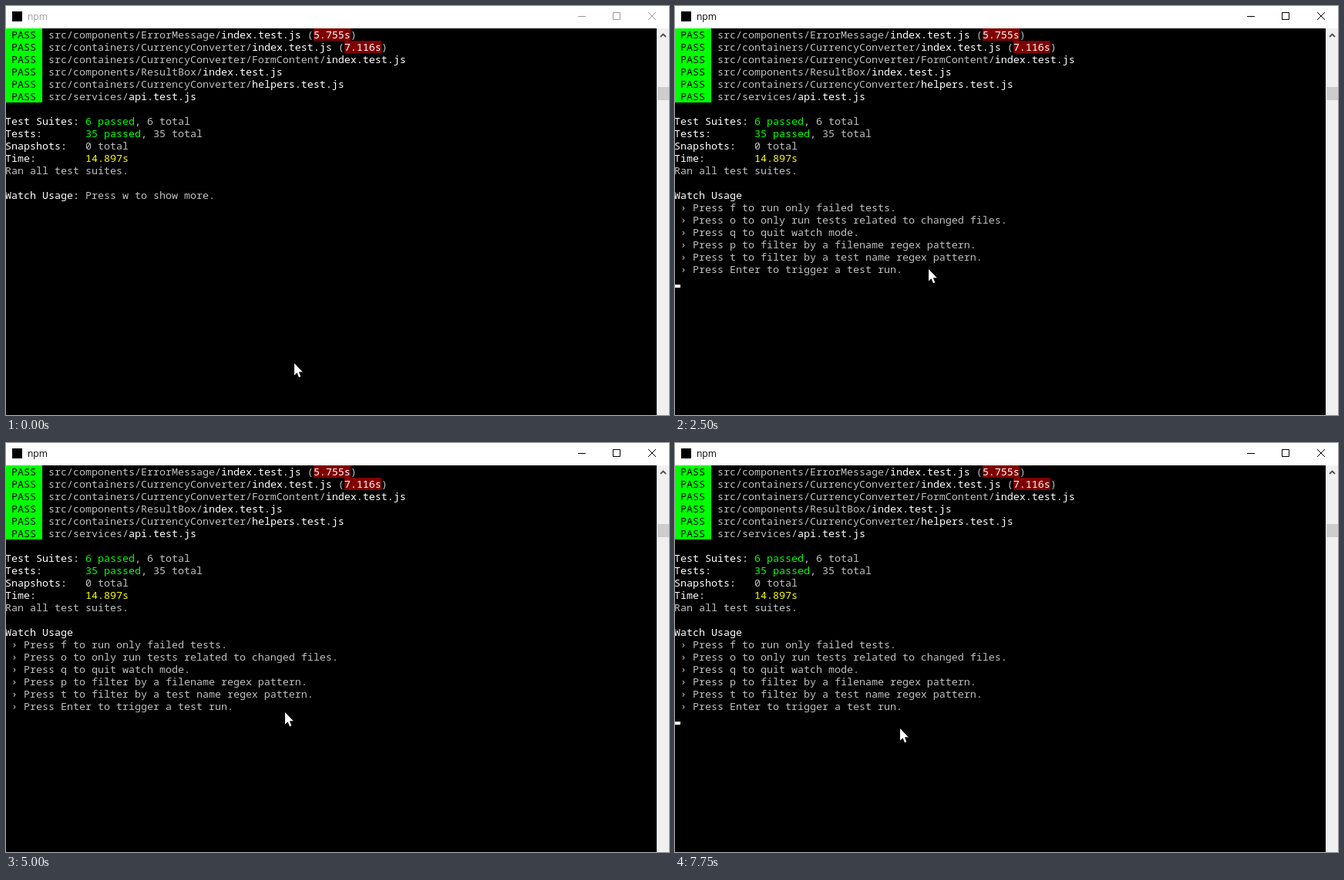
An HTML page that plays this animation: 860x530 px, repeating every 8000 ms.

```html
<!DOCTYPE html>
<html lang="en">
<head>
<meta charset="utf-8">
<title>npm</title>
<style>
  html, body { margin: 0; width: 100%; height: 100%; overflow: hidden; background: #000; }
  #stage { position: relative; width: 860px; height: 530px; overflow: hidden; background: #000; }
  pre {
    position: absolute; left: -1px; top: 29px; margin: 0;
    font: 13.3333px/16px "Noto Sans Mono", monospace; color: #c0c0c0;
  }
  pre span { display: inline-block; height: 16px; }
  .w, .g, .y { font-weight: 500; }
  .w { color: #fff; }
  .g { color: #0f0; }
  .y { color: #ff0; }
  .pass { color: #000; background: #0f0; }
  .slow { color: #fff; background: #800000; }
  svg { position: absolute; left: 0; top: 0; }
</style>
</head>
<body>
<div id="stage">
  <pre id="screen"></pre>
  <svg width="860" height="530">
    <rect width="860" height="29" fill="#fff"/>
    <rect x="8" y="7" width="13" height="13"/>
    <g id="titleBar">
      <text x="28" y="18" font-size="12" font-family="Open Sans, sans-serif">npm</text>
      <path d="M742 13.5h10M787.5 8.5h9v9h-9zM833 8l10 10M843 8l-10 10" fill="none" stroke="currentColor"/>
    </g>
    <rect x="844" y="29" width="16" height="501" fill="#f0f0f0"/>
    <rect x="845" y="105" width="15" height="17" fill="#cdcdcd"/>
    <path d="M849 40l3.5-3.5 3.5 3.5" fill="none" stroke="#505050" stroke-width="1.8"/>
    <rect id="caret" width="8" height="4" fill="#fff"/>
    <path id="mouse" d="M0 0V15.6L3.5 12.3 6 18.3 8.3 17.3 5.9 11.3H10.8Z" fill="#fff"/>
  </svg>
</div>
<script>
const LOOP = 8000, STEP = 250;
const FOCUS = 1250, CARET_SHOWN = 1750, MENU = 2500;
const BLINK_START = 2755, BLINK = 530;
const $ = id => document.getElementById(id);
const span = (cls, text) => `<span class="${cls}">${text}</span>`;

const suite = (folder, file, time) =>
  span('pass', ' PASS ') + ` src/${folder}/` + span('w', file + '.test.js') +
  (time ? ` (${span('slow', time)})` : '');
const stat = (label, color, value, rest = '') =>
  span('w', label.padEnd(13)) + span(color, value) + rest;

const report = [
  suite('components/ErrorMessage', 'index', '5.755s'),
  suite('containers/CurrencyConverter', 'index', '7.116s'),
  suite('containers/CurrencyConverter/FormContent', 'index'),
  suite('components/ResultBox', 'index'),
  suite('containers/CurrencyConverter', 'helpers'),
  suite('services', 'api'),
  '',
  stat('Test Suites:', 'g', '6 passed', ', 6 total'),
  stat('Tests:', 'g', '35 passed', ', 35 total'),
  stat('Snapshots:', '', '0 total'),
  stat('Time:', 'y', '14.897s'),
  'Ran all test suites.',
  ''
];
const hint = [span('w', 'Watch Usage:') + ' Press w to show more.'];
const menu = [
  span('w', 'Watch Usage'),
  ...[
    'f to run only failed tests.',
    'o to only run tests related to changed files.',
    'q to quit watch mode.',
    'p to filter by a filename regex pattern.',
    't to filter by a test name regex pattern.',
    'Enter to trigger a test run.'
  ].map(text => ' › Press ' + text)
];

// The pointer rests between straight strokes.
const home = { x: 374, y: 463 };
const strokes = [
  { from: 0, to: 250, x: 343, y: 413 },
  { from: 250, to: 1000, x: 329, y: 341 },
  { from: 2500, to: 2750, x: 329, y: 356 },
  { from: 3000, to: 3500, x: 330, y: 335 },
  { from: 3750, to: 4000, x: 341, y: 345 },
  { from: 4250, to: 5000, x: 362, y: 349 },
  { from: 5000, to: 5250, x: 351, y: 358 },
  { from: 5500, to: 5750, x: 291, y: 361 },
  { from: 6750, to: 7000, x: 292, y: 370 }
];
const pointerAt = t => strokes.reduce((pos, { from, to, x, y }) => {
  const k = Math.min(1, Math.max(0, (t - from) / (to - from)));
  return { x: pos.x + (x - pos.x) * k, y: pos.y + (y - pos.y) * k };
}, home);

function caretVisible(t) {
  const flips = Math.max(0, Math.ceil((t - BLINK_START) / BLINK));
  return t >= CARET_SHOWN && flips % 2 === 0;
}

let shown;
function render(t) {
  const lines = t < MENU ? hint : menu;
  if (shown !== lines) {
    shown = lines;
    $('screen').innerHTML = [...report, ...lines].join('\n');
  }

  const color = t < FOCUS ? '#999' : '#000';
  $('titleBar').setAttribute('fill', color);
  $('titleBar').setAttribute('color', color);

  const [column, row] = t < MENU ? [34, 13] : [0, 20];
  $('caret').setAttribute('x', column * 8 - 1);
  $('caret').setAttribute('y', row * 16 + 41);
  $('caret').setAttribute('visibility', caretVisible(t) ? 'visible' : 'hidden');

  const { x, y } = pointerAt(t);
  $('mouse').setAttribute('transform', `translate(${Math.round(x)} ${Math.round(y)})`);
}

const startTime = performance.now();
function tick() {
  const t = (performance.now() - startTime) % LOOP;
  render(Math.floor(t / STEP) * STEP);
  requestAnimationFrame(tick);
}
tick();
</script>
</body>
</html>
```
